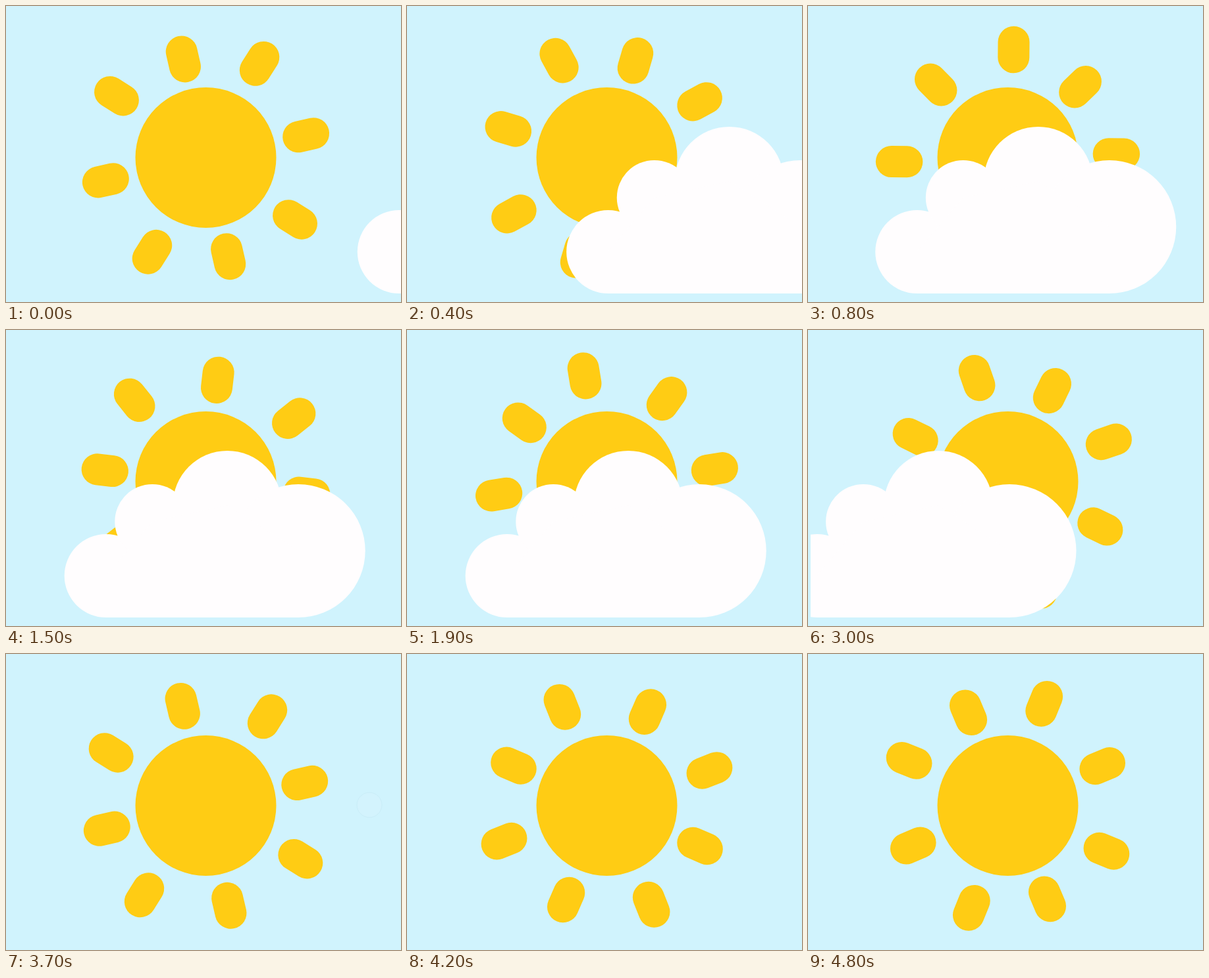
Recreate the animation shown at these times as an HTML page. Size 600 by 451 pixels, loop 4900 ms.

```html
<!DOCTYPE html>
<html lang="en">
<head>
<meta charset="utf-8">
<title>Sun and cloud</title>
<style>
  html, body { margin: 0; height: 100%; overflow: hidden; background: #d0f3fd; }
  svg { display: block; width: 100vw; height: 100vh; }
</style>
</head>
<body>
<svg viewBox="0 0 600 451">
  <defs>
    <rect id="ray" x="-24" y="-35.75" width="48" height="71.5" rx="24"/>
    <clipPath id="view"><rect x="4" width="596" height="451"/></clipPath>
  </defs>
  <g fill="#ffcc14">
    <circle cx="303.5" cy="231" r="107"/>
    <g id="rays"></g>
  </g>
  <circle id="spot" cx="552" cy="230" r="19" fill="#d3f3fd" stroke="#c9edf8"/>
  <g clip-path="url(#view)">
    <g id="cloud" fill="#fffdfe">
      <circle cx="152.2" cy="374.5" r="63.5"/>
      <circle cx="222.3" cy="292" r="57"/>
      <circle cx="336.2" cy="266.7" r="82.7"/>
      <circle cx="444.2" cy="336.5" r="101.5"/>
      <path d="M152 438V374L222 292L336 267L444 336V438Z"/>
    </g>
  </g>
</svg>
<script>
const LOOP = 4900, STEP = 100, ACCEL = 474;
const ARRIVE = 0.969, LEAVE = 2.46; // seconds
const $ = id => document.getElementById(id);

// x, y, tilt; every ray has a twin on the opposite side
const RAYS = [[0, -154.2, 0], [111.3, -121.8, 45], [156, 0, 90], [111.3, 121.8, 135]];
$('rays').innerHTML = RAYS.flatMap(ray => [0, 180].map(turn =>
  `<use href="#ray" transform="rotate(${turn}) translate(${ray[0]} ${ray[1]}) rotate(${ray[2]})"/>`
)).join('');

// Slides in slowing down, rests, then slides out speeding up
function cloudOffset(t) {
  const before = Math.max(0, ARRIVE - t), after = Math.max(0, t - LEAVE);
  return ACCEL * (before * before - after * after);
}

function draw(ms) {
  const t = Math.floor(ms % LOOP / STEP) * STEP / 1000;
  $('rays').setAttribute('transform', `translate(303.5 231.3) rotate(${-12.8 + 72.9 * t})`);
  $('cloud').setAttribute('transform', `translate(${cloudOffset(t)} 0)`);
  $('spot').setAttribute('opacity', Math.max(0, 1 - Math.abs(t - 3.7) / 0.4));
}

const start = performance.now();
function tick() {
  draw(performance.now() - start);
  requestAnimationFrame(tick);
}
tick();
</script>
</body>
</html>
```
